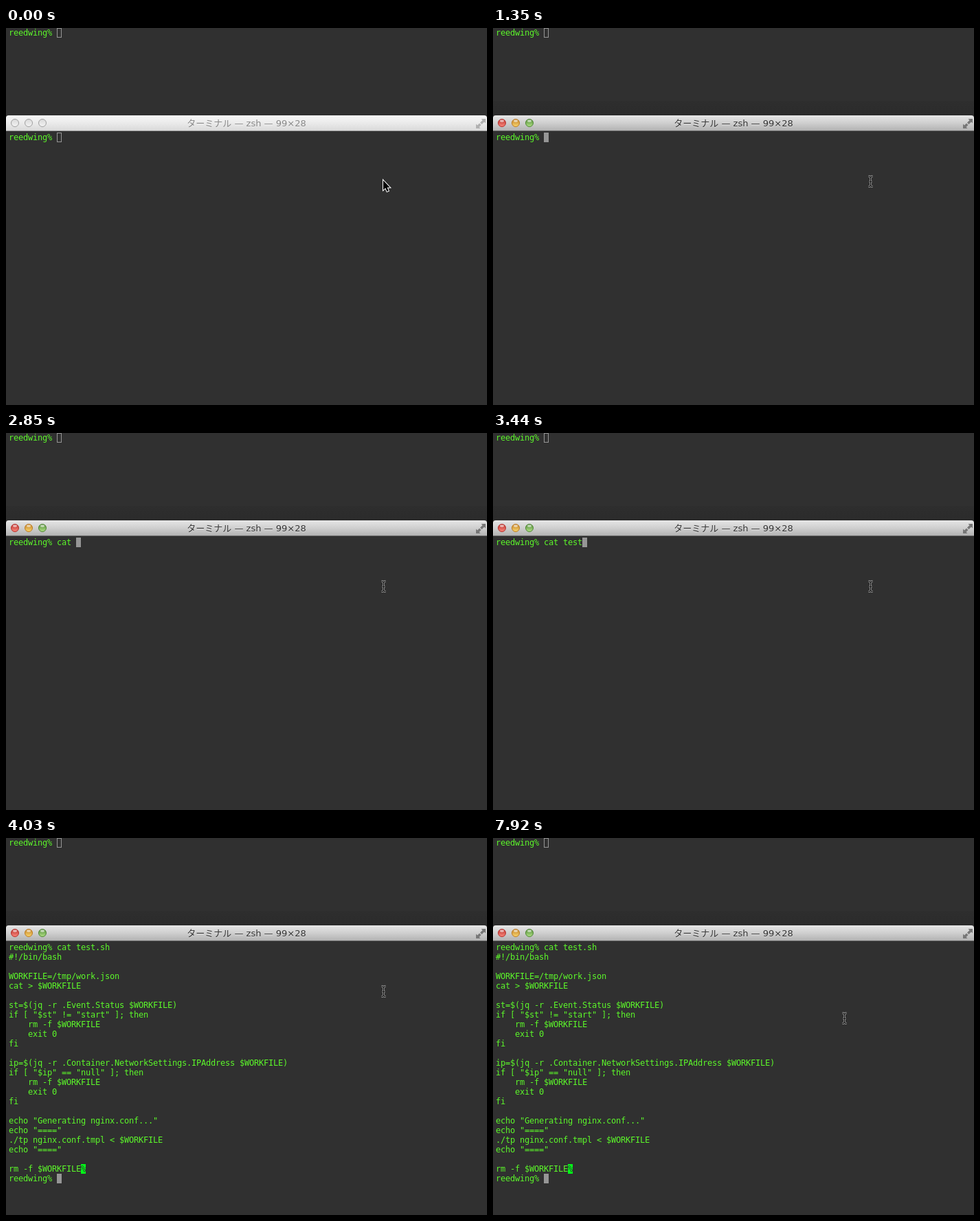
Animation of 700x548 px, one loop 8000 ms. Source, as an HTML page with a canvas:

```html
<!DOCTYPE html>
<html lang="ja">
<head>
<meta charset="utf-8">
<title>Terminal</title>
<style>
html, body { margin: 0; width: 100%; height: 100%; overflow: hidden; background: #303030; }
canvas { display: block; }
</style>
</head>
<body>
<canvas id="stage" width="700" height="548"></canvas>
<script>
const ctx = document.getElementById('stage').getContext('2d');

const LOOP = 8000;
const POINTER_SWAP = 1200, FOCUS = 1350, ENTER = 4030;
const KEY_TIMES = [2400, 2550, 2700, 2850, 3000, 3150, 3290, 3440, 3590, 3740, 3890];
const BEAM_STOPS = [[0, 549.5, 223], [7630, 548.5, 223], [7780, 547.5, 223], [7920, 511.5, 262]];

const BG = '#303030', GREEN = '#5cf82a', GREY = '#969696';
const LEFT = 4, CELL = 7, LINE = 14, SHELL_TOP = 152;
const PROMPT = 'reedwing% ', COMMAND = 'cat test.sh';
const SCRIPT = `#!/bin/bash

WORKFILE=/tmp/work.json
cat > $WORKFILE

st=$(jq -r .Event.Status $WORKFILE)
if [ "$st" != "start" ]; then
    rm -f $WORKFILE
    exit 0
fi

ip=$(jq -r .Container.NetworkSettings.IPAddress $WORKFILE)
if [ "$ip" == "null" ]; then
    rm -f $WORKFILE
    exit 0
fi

echo "Generating nginx.conf..."
echo "===="
./tp nginx.conf.tmpl < $WORKFILE
echo "===="

rm -f $WORKFILE`.split('\n');

const cellX = column => LEFT + column * CELL;

function rect(x, y, w, h, color) {
  ctx.fillStyle = color;
  ctx.fillRect(x, y, w, h);
}

function verticalGradient(top, bottom, ...colors) {
  const gradient = ctx.createLinearGradient(0, top, 0, bottom);
  colors.forEach((color, i) => gradient.addColorStop(i / (colors.length - 1), color));
  return gradient;
}

function polygon(points, fill, stroke) {
  ctx.beginPath();
  points.forEach(([x, y]) => ctx.lineTo(x, y));
  ctx.closePath();
  if (stroke) {
    ctx.strokeStyle = stroke;
    ctx.lineWidth = 2;
    ctx.stroke();
  }
  ctx.fillStyle = fill;
  ctx.fill();
}

// Terminal text sits on a whole-pixel character grid.
function print(text, top, column = 0, color = GREEN) {
  ctx.font = '12px "DejaVu Sans Mono", monospace';
  ctx.textAlign = 'left';
  ctx.fillStyle = color;
  [...text].forEach((char, i) => ctx.fillText(char, cellX(column + i), top + 11));
}

function caret(column, top, solid) {
  if (solid) return rect(cellX(column), top, CELL, LINE, GREY);
  ctx.strokeStyle = GREY;
  ctx.lineWidth = 1;
  ctx.strokeRect(cellX(column) + .5, top + .5, CELL - 1, LINE - 1);
}

function titleButton(x, active, light, dark) {
  ctx.beginPath();
  ctx.arc(x, 138, 5.5, 0, Math.PI * 2);
  ctx.fillStyle = active ? verticalGradient(132, 144, dark, light) : verticalGradient(132, 144, '#d8d8d8', '#f5f5f5');
  ctx.fill();
  ctx.strokeStyle = active ? dark : '#a0a0a0';
  ctx.lineWidth = 1;
  ctx.stroke();
  if (!active) return;
  ctx.beginPath();
  ctx.ellipse(x, 135, 3, 1.8, 0, 0, Math.PI * 2);
  ctx.fillStyle = 'rgba(255,255,255,.6)';
  ctx.fill();
}

function resizeIcon(color) {
  polygon([[691.5, 132], [698, 132], [698, 138.5], [696, 136.5], [692.5, 140], [690, 137.5], [693.5, 134]], color);
  polygon([[684, 139.5], [686, 141.5], [689, 138.5], [691.5, 141], [688.5, 144], [690.5, 146], [684, 146]], color);
}

function titleBar(active) {
  if (active) rect(0, 106, 700, 21, verticalGradient(106, 127, '#2e2e2e', '#2b2b2b'));
  ctx.beginPath();
  ctx.roundRect(0, 127, 700, 23, [4, 4, 0, 0]);
  ctx.fillStyle = active
    ? verticalGradient(127, 150, '#e6e6e6', '#cecece', '#b0b0b0')
    : verticalGradient(127, 150, '#f8f8f8', '#eaeaea', '#d8d8d8');
  ctx.fill();
  rect(0, 149, 700, 1, active ? '#686868' : '#999');

  titleButton(13, active, '#ff8c80', '#b6302c');
  titleButton(33, active, '#ffdc72', '#bd7b22');
  titleButton(53, active, '#b6e68a', '#4f8735');
  resizeIcon(active ? '#777' : '#b0b0b0');

  ctx.font = '13px "DejaVu Sans", "Noto Sans CJK JP", sans-serif';
  ctx.textAlign = 'center';
  const title = 'ターミナル — zsh — 99×28';
  ctx.fillStyle = 'rgba(255,255,255,.45)';
  ctx.fillText(title, 350, 144);
  ctx.fillStyle = active ? '#333' : '#878787';
  ctx.fillText(title, 350, 143);
}

function arrowPointer(x, y) {
  const shape = [[0, 0], [0, 14], [3.2, 11], [5.5, 16.2], [7.8, 15.2], [5.6, 10.2], [9.7, 10.2]];
  ctx.lineJoin = 'miter';
  polygon(shape.map(([dx, dy]) => [x + dx, y + dy]), '#000', '#fff');
}

function beamPointer(x, y) {
  const beam = new Path2D();
  for (const side of [-1, 1]) {
    for (const end of [-1, 1]) {
      beam.moveTo(x + side * 3, y + end * 7.5);
      beam.quadraticCurveTo(x, y + end * 7.5, x, y + end * 5);
    }
  }
  beam.moveTo(x, y - 5);
  beam.lineTo(x, y + 5);
  beam.moveTo(x - 2, y + .5);
  beam.lineTo(x + 2, y + .5);
  for (const [color, width] of [['#a0a0a0', 2.8], ['#151515', 1.2]]) {
    ctx.strokeStyle = color;
    ctx.lineWidth = width;
    ctx.stroke(beam);
  }
}

function shell(t) {
  const typed = KEY_TIMES.filter(time => time <= t).length;
  print(PROMPT + COMMAND.slice(0, typed), SHELL_TOP);
  if (t < ENTER) return caret(PROMPT.length + typed, SHELL_TOP, t >= FOCUS);

  SCRIPT.forEach((line, i) => print(line, SHELL_TOP + (i + 1) * LINE));
  const lastTop = SHELL_TOP + SCRIPT.length * LINE;
  const endColumn = SCRIPT.at(-1).length;
  rect(cellX(endColumn), lastTop, CELL, LINE, '#00ff18');
  print('%', lastTop, endColumn, BG);
  print(PROMPT, lastTop + LINE);
  caret(PROMPT.length, lastTop + LINE, true);
}

function draw(t) {
  rect(0, 0, 700, 548, BG);
  print(PROMPT, 0);
  caret(PROMPT.length, 0, false);
  titleBar(t >= FOCUS);
  shell(t);
  if (t < POINTER_SWAP) {
    arrowPointer(549, 221.5);
  } else {
    const [, x, y] = BEAM_STOPS.findLast(([time]) => time <= t);
    beamPointer(x, y);
  }
}

const start = performance.now();
function tick() {
  draw((performance.now() - start) % LOOP);
  requestAnimationFrame(tick);
}
tick();
</script>
</body>
</html>
```
